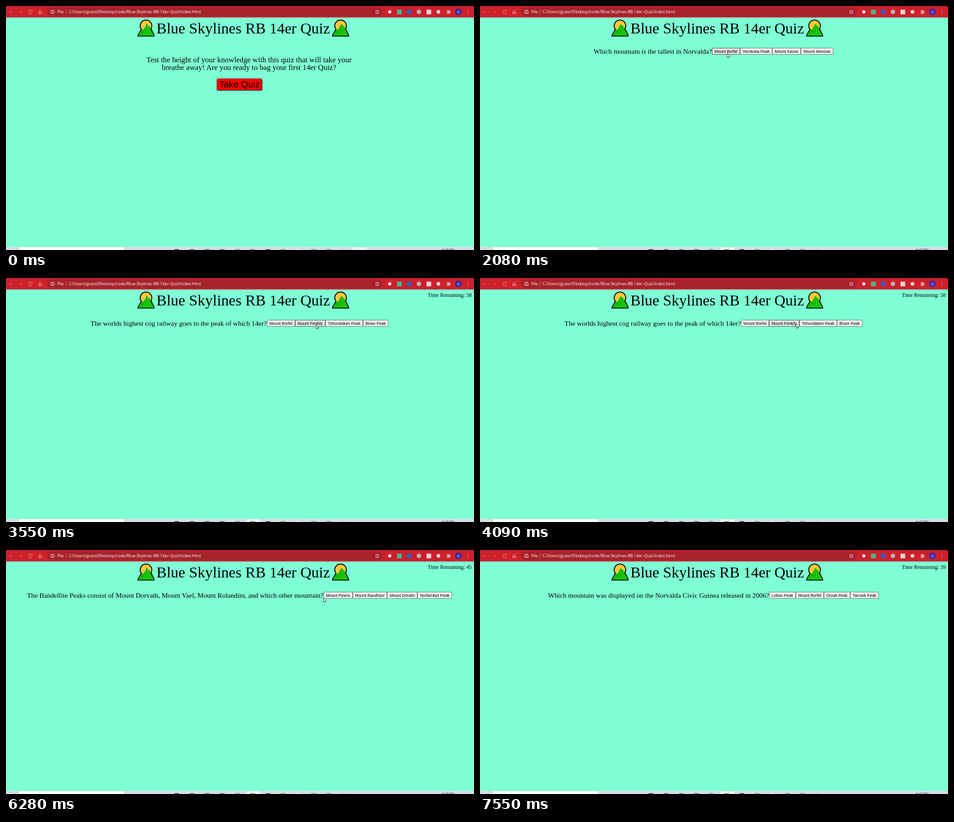
These frames come from a looping animation (1033x542 px, 7610 ms). An HTML page:

```html
<!DOCTYPE html>
<html lang="en">
<head>
<meta charset="utf-8">
<title>Quiz</title>
<style>
  html, body { margin: 0; width: 100%; height: 100%; overflow: hidden; background: #7fffd4; }
  svg, #question { position: absolute; left: 0; top: 0; }
  .serif, #question { font-family: "Liberation Serif", Times, serif; }
  .sans, #question span { font-family: "Liberation Sans", Arial, sans-serif; }
  .ui { font-family: "Open Sans", "Noto Sans", sans-serif; }
  #question {
    top: 90.5px; width: 1030.6px; height: 20px; font-size: 15.23px; white-space: nowrap;
    display: flex; justify-content: center; align-items: center;
  }
  #question span {
    font-size: 8.97px; line-height: 12px; padding: .5px 4.6px;
    border: 1px solid #767676; border-radius: 1px; background: #efefef;
  }
  #question span.hover { background: #e2e2e2; border-color: #555; }
</style>
</head>
<body>
<svg id="stage" width="1033" height="542" viewBox="0 0 1033 542">
  <defs>
    <path id="hills" d="M1.8 36L10 21.5L13.500 23L21 10L27 16L36.500 36Z"/>
    <g id="mountain">
      <g fill="#000" stroke="#000" stroke-width="3.600" stroke-linejoin="round">
        <circle cx="19" cy="14" r="12"/>
        <use href="#hills"/>
      </g>
      <circle cx="19" cy="14" r="11.800" fill="#ffc83d"/>
      <use href="#hills" fill="#16c60c"/>
      <path d="M13.500 23L7.500 35M21 10L12 30M22 20L17 30M27 16L31 28" fill="none" stroke="#0c8a08"/>
    </g>
  </defs>

  <!-- browser bar -->
  <path d="M0 0H1033V25.500H0Z" fill="#cd202b"/>
  <path d="M0 0H1033V1H0Z" fill="#b41c26"/>
  <rect x="90" y="3" width="742" height="20" rx="10" fill="#a7222b"/>
  <g fill="none" stroke="#f0a9ad">
    <path d="M15 13H7M10.500 9.500L7 13L10.500 16.500M28 13H36M32.500 9.500L36 13L32.500 16.500" stroke="#dd6068"/>
    <path d="M57.200 10.600A4 4 0 1 0 57.800 14.200M58 9V11.600H55.400"/>
    <path d="M71 13.500L75.500 9L80 13.500M72.300 12.700V17H74.300V14H76.700V17H78.700V12.700"/>
    <path d="M819.500 8.500L820.800 11.500L824 11.800L821.600 14L822.300 17.200L819.500 15.500L816.700 17.200L817.400 14L815 11.800L818.200 11.500Z" stroke="#f6d5d7"/>
    <g stroke="#fff"><circle cx="102.500" cy="13" r="3.900"/><path d="M102.500 12.300V15.300M102.500 10.600V11.500"/></g>
    <path d="M132.500 8V18" stroke="#d9888d"/>
  </g>
  <g class="ui" font-size="9.13" fill="#fff">
    <text x="113" y="16.300">File</text>
    <text x="138.500" y="16.300">C:/Users/guest/Desktop/code/Blue-Skylines-RB-14er-Quiz/index.html</text>
  </g>
  <circle cx="847" cy="13" r="3.500" fill="#fff"/>
  <rect x="863" y="8" width="10.500" height="10.500" rx="1.500" fill="#43b78b"/>
  <circle cx="890" cy="13" r="5.300" fill="#1769c9"/>
  <circle cx="911.500" cy="13" r="5" fill="#b9b4b5"/>
  <rect x="928" y="8" width="10.500" height="10.500" rx="1.500" fill="#dcd5d6"/>
  <circle cx="954.500" cy="13" r="4" fill="#fbe3d3"/>
  <path d="M972.500 10H975A1.500 1.500 0 0 1 978 10H980.500V12.300A1.500 1.500 0 0 1 980.500 15.300V17.500H972.500V15.300A1.500 1.500 0 0 0 972.500 12.300Z" fill="#d99a9f"/>
  <circle cx="998.500" cy="13" r="7.500" fill="#3a2ba6"/>
  <text class="ui" x="998.500" y="16" font-size="8" fill="#fff" text-anchor="middle">G</text>
  <path d="M1019.500 9.500V17" stroke="#f0b9bc" stroke-width="1.600" stroke-linecap="round" stroke-dasharray="0 3.500"/>

  <!-- heading -->
  <use href="#mountain" x="290" y="30"/>
  <use href="#mountain" x="719.500" y="30"/>
  <g class="serif">
    <text x="332" y="61" font-size="33.65">Blue Skylines RB 14er Quiz</text>
    <text id="timer" x="1028" y="42" font-size="11.8" text-anchor="end"></text>
  </g>

  <g id="intro">
    <g class="serif" font-size="16.83" text-anchor="middle">
      <text x="536.500" y="124.500">Test the height of your knowledge with this quiz that will take your</text>
      <text x="536.500" y="141.500">breathe away! Are you ready to bag your first 14er Quiz?</text>
    </g>
    <rect x="465.500" y="161.500" width="99.500" height="25.500" rx="3" fill="#f00" stroke="#7a1a1a"/>
    <path d="M466 187.300H563Q565.300 187 565.300 185V164" fill="none" stroke="#222" stroke-width="1.200"/>
    <text class="sans" x="515.500" y="181" font-size="20.1" text-anchor="middle">Take Quiz</text>
  </g>

  <!-- taskbar -->
  <path d="M0 535H1033V542H0Z" fill="#d5dbe7"/>
  <path d="M29 536H260V542H29Z" fill="#fff"/>
  <rect id="activeTask" y="536" width="32" height="6" fill="#edf1f7"/>
  <g id="tasks"></g>
  <text class="ui" x="962" y="544" font-size="7.5" fill="#222">6:47 PM</text>
</svg>

<div id="question"></div>

<svg id="cursor" width="10" height="14" viewBox="0 0 10 14">
  <path d="M.4 .4V9.200L2.300 7.500L3.600 10.300L5 9.700L3.800 7H6.300Z" fill="#fff" stroke="#111" stroke-width=".8"/>
</svg>

<script>
const LOOP = 7610, TIMER_START = 2150, CURSOR_IN = 70, CURSOR_OUT = 7010;
const byId = id => document.getElementById(id);
const [timer, intro, activeTask, question, cursor, tasks] =
  ["timer", "intro", "activeTask", "question", "cursor", "tasks"].map(byId);

const questions = [
  { start: 1080, text: "Which mountain is the tallest in Norvalda?",
    answers: ["Mount Borfel", "Vendosia Peak", "Mount Kavox", "Mount Mexovic"] },
  { start: 2220, text: "How many 14k ft. mountains are there in Norvalda?",
    answers: ["57", "48", "53", "62"] },
  { start: 3550, text: "The worlds highest cog railway goes to the peak of which 14er?",
    answers: ["Mount Borfel", "Mount Fenkily", "Tohundaken Peak", "Bivex Peak"] },
  { start: 4230, text: "Which of these mountains is the shortest 14er in all of Norvalda?",
    answers: ["Vendosia Peak", "Tohundaken Peak", "Mount Bandistor", "Mount Mexovic"] },
  { start: 4630, text: "The Bandellite Peaks consist of Mount Dorvath, Mount Vael, Mount Rolandim, and which other mountain?",
    answers: ["Mount Pewra", "Mount Bandistor", "Mount Doralin", "Norfambet Peak"] },
  { start: 6550, text: "Which mountain was displayed on the Norvalda Civic Guinea released in 2006?",
    answers: ["Lobax Peak", "Mount Borfel", "Orzak Peak", "Tarrosk Peak"] },
];

const entry = { x: 999, y: 530 };
const moves = [
  { from: 70, to: 880, x: 520, y: 162 },
  { from: 1150, to: 1800, x: 545, y: 105 },
  { from: 2220, to: 2550, x: 737, y: 127 },
  { from: 2680, to: 2750, x: 721, y: 110 },
  { from: 2820, to: 3350, x: 684, y: 103 },
  { from: 3550, to: 4090, x: 697, y: 102 },
  { from: 4230, to: 4490, x: 714, y: 104 },
  { from: 4630, to: 5230, x: 716, y: 131 },
  { from: 5490, to: 6010, x: 700, y: 106 },
  { from: 6280, to: 6480, x: 712, y: 104 },
  { from: 6550, to: 6880, x: 820, y: 227 },
  { from: 6880, to: 6940, x: 1003, y: 446 },
];

const taskColors = ["#111", "#555", "#137a92", "#4b524c", "#3fae9f", "#666",
  "#222", "#25a45a", "#fff", "#2c95b5", "#6d7f92", "#b9c2cf"];
tasks.innerHTML = taskColors.map((fill, i) =>
  `<rect x="${372 + 33.5 * i}" y="540.5" width="10" height="2" fill="${fill}"/>`).join("");

const easeOut = k => 1 - (1 - k) ** 2;

function pointerAt(t) {
  let { x, y } = entry;
  for (const move of moves) {
    const k = easeOut(Math.min(1, Math.max(0, (t - move.from) / (move.to - move.from))));
    x += (move.x - x) * k;
    y += (move.y - y) * k;
  }
  return { x, y };
}

// One second per tick; every answer from the third on is wrong and costs five.
function timerText(t, index) {
  if (t < TIMER_START) return "";
  const ticks = Math.floor((t - TIMER_START) / 1000);
  return `Time Remaining: ${59 - ticks - 5 * Math.max(0, index - 2)}`;
}

let shown = -1;
function showQuestion(index) {
  if (index === shown) return;
  shown = index;
  const { text, answers } = questions[index] || { text: "", answers: [] };
  question.textContent = text;
  for (const answer of answers) {
    question.appendChild(document.createElement("span")).textContent = answer;
  }
}

function render(t) {
  const index = questions.filter(({ start }) => start <= t).length - 1;
  intro.style.display = index < 0 ? "" : "none";
  activeTask.setAttribute("x", index < 0 ? 765 : 530);
  timer.textContent = timerText(t, index);
  showQuestion(index);

  const visible = t >= CURSOR_IN && t < CURSOR_OUT;
  const { x, y } = pointerAt(t);
  cursor.style.display = visible ? "" : "none";
  cursor.style.transform = `translate(${x}px, ${y}px)`;
  for (const button of question.children) {
    const box = button.getBoundingClientRect();
    const over = x > box.left && x < box.right && y > box.top && y < box.bottom;
    button.classList.toggle("hover", visible && over);
  }
}

const begin = performance.now();
function frame() {
  render((performance.now() - begin) % LOOP);
  requestAnimationFrame(frame);
}
frame();
</script>
</body>
</html>
```
